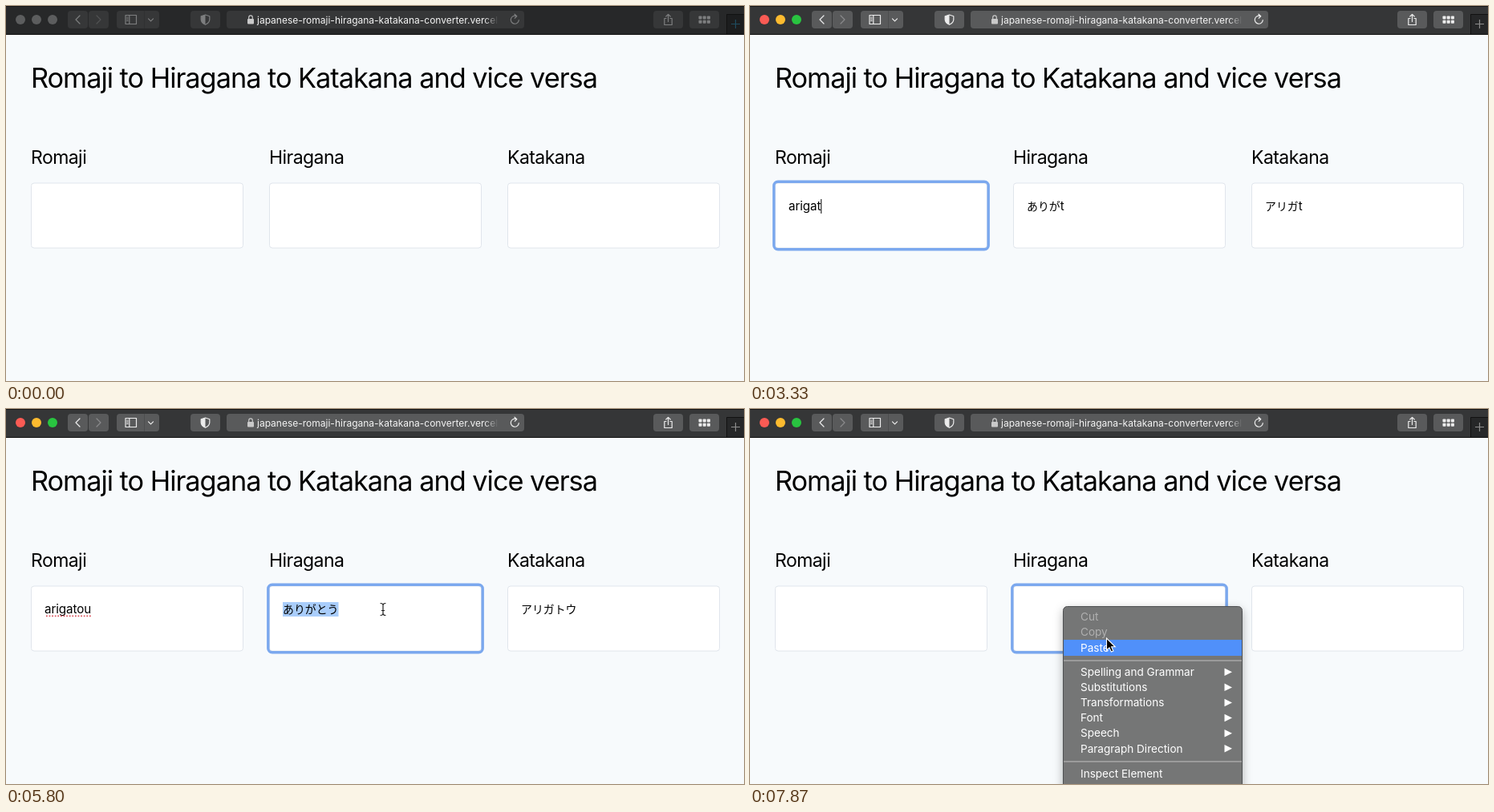
Recreate the animation shown at these times as an HTML page. Size 920 px wide and 468 px high, loop 8 s.

```html
<!DOCTYPE html>
<html lang="en">
<head>
<meta charset="utf-8">
<title>Kana converter</title>
<style>
  html, body { margin: 0; width: 100%; height: 100%; overflow: hidden; background: #f7fafc; }
  svg { display: block; width: 920px; height: 468px; --bar: #353637; --btn: #595a5b; --ink: #ececec; --dim: #8a8a8b; --plus: #8d8d8d; }
  svg.idle { --bar: #272829; --btn: #363738; --ink: #7d7e7f; --dim: #515253; --plus: #1f4c5f; }
  text { font-family: Inter, "Noto Sans CJK JP", "Noto Sans CJK", sans-serif; font-optical-sizing: none; white-space: pre; }
  .title { font-size: 34.3px; letter-spacing: -1.01px; }
  .label { font-size: 23px; letter-spacing: -.55px; }
  .value { font-size: 15.2px; letter-spacing: -.1px; }
  .kana { font-family: "Noto Sans CJK JP", "Noto Sans CJK", sans-serif; font-size: 13.9px; letter-spacing: 0; }
  .url { font-size: 12px; fill: #f4f4f4; }
  .item { font-size: 13.55px; fill: #fff; }
  .off { fill: #b0b0b0; }
  .btn { fill: var(--btn); }
  .icon { fill: none; stroke: var(--ink); stroke-width: 1.2; stroke-linecap: round; stroke-linejoin: round; }
  .solid { fill: var(--ink); }
</style>
</head>
<body>
<svg id="stage" viewBox="0 0 920 468" xmlns="http://www.w3.org/2000/svg">
  <defs>
    <linearGradient id="fade" gradientUnits="userSpaceOnUse" x1="596" x2="614" y1="0" y2="0">
      <stop offset="0" stop-color="#fff"/><stop offset="1" stop-color="#fff" stop-opacity="0"/>
    </linearGradient>
    <mask id="urlMask" maskUnits="userSpaceOnUse" x="300" y="0" width="320" height="36">
      <rect x="300" width="313" height="36" fill="url(#fade)"/>
    </mask>
    <filter id="shadow" x="-20%" y="-20%" width="140%" height="140%">
      <feDropShadow dx="0" dy="4" stdDeviation="6" flood-color="#000" flood-opacity=".3"/>
    </filter>
  </defs>
  <rect width="920" height="468" fill="#f7fafc"/>
  <g id="toolbar"></g>
  <text class="title" x="31" y="102">Romaji to Hiragana to Katakana and vice versa</text>
  <g id="fields"></g>
  <rect id="ring" y="219.2" width="267.4" height="84.6" rx="5" fill="none" stroke="#7ba8ee" stroke-width="3.4"/>
  <rect id="selection" x="345" y="241" width="69.5" height="18" fill="#a9cdfb"/>
  <g id="values"></g>
  <path id="spelling" d="M50 258.3H107" stroke="#d9505a" stroke-width="1.7" stroke-dasharray="1.7 1.9"/>
  <rect id="caret" y="241" width="1" height="18"/>
  <g id="menu"></g>
  <g id="beam" fill="none" stroke-linecap="round">
    <path d="M-3 -7.5Q0 -7.5 0 -5Q0 -7.5 3 -7.5M0 -5V5M-3 7.5Q0 7.5 0 5Q0 7.5 3 7.5M-1.6 1.5H1.6" stroke="#222" stroke-width="1.2"/>
  </g>
  <path id="arrow" d="M0 0V15L3.5 11.8L5.9 17L8.4 15.9L6.1 10.8H10.8Z" fill="#000" stroke="#fff" stroke-width="1.1"/>
</svg>
<script>
const $ = id => document.getElementById(id);
const show = (id, on) => $(id).setAttribute('visibility', on ? 'visible' : 'hidden');
const LOOP = 8000, TICK = 1000 / 15;
const LEFT = [31, 328, 625];

function buildToolbar() {
  const button = (x, w) => `<rect class="btn" x="${x}" y="6" width="${w}" height="22" rx="4"/>`;
  const icon = (d, extra = '') => `<path class="icon" d="${d}" ${extra}/>`;
  const dots = [0, 1, 2].flatMap(c => [0, 1].map(r =>
    `<rect class="solid" x="${863.5 + c * 5.2}" y="${12.5 + r * 5.2}" width="4" height="4" rx=".8"/>`));
  $('toolbar').innerHTML = `
    <rect width="920" height="36" style="fill:var(--bar)"/>
    <rect width="920" height="1" fill="#161616"/>
    <rect x="898" y="10" width="22" height="26" fill="#000" opacity=".28"/>
    <path d="M898.5 36V10.5H920" fill="none" stroke="#121212"/>
    <path d="M904 22.5H915M909.5 17V28" style="stroke:var(--plus)" stroke-width="1.2"/>
    <rect y="35" width="920" height="1" fill="#111"/>
    ${[18, 38, 58].map(x => `<circle class="light" cx="${x}" cy="17" r="6"/>`).join('')}
    ${button(77, 25)}${button(103, 25)}${button(138, 53)}${button(230, 37)}
    ${button(275, 371)}${button(807, 37)}${button(852, 37)}
    ${icon('M92 12L87 17L92 22', 'stroke-width="1.6"')}
    ${icon('M113 12L118 17L113 22', 'style="stroke:var(--dim)"')}
    ${icon('M149 11.5H162.5V22.5H149ZM153.8 11.5V22.5M150.8 14H152M150.8 16.2H152M150.8 18.4H152')}
    <path d="M172.5 6V28" style="stroke:var(--bar)" opacity=".35"/>
    ${icon('M177.5 15.8L180.5 18.8L183.5 15.8')}
    ${icon('M248.5 11L253.8 12.8V17Q253.6 21 248.5 23.3Q243.4 21 243.2 17V12.8Z')}
    <path class="solid" d="M248.5 11L243.2 12.8V17Q243.4 21 248.5 23.3Z"/>
    <rect x="301" y="16" width="8" height="6.5" rx="1" fill="#c9c9c9"/>
    ${icon('M302.7 16V14.3A2.3 2.5 0 0 1 307.3 14.3V16', 'style="stroke:#c9c9c9"')}
    <text class="url" x="313" y="21.5" mask="url(#urlMask)">japanese-romaji-hiragana-katakana-converter.vercel.</text>
    ${icon('M639.3 17.5A5 5 0 1 1 636.2 12.6M634 10.2L636.8 12.7L634.2 15.2')}
    ${icon('M823 15.5H820.8V23.5H830.2V15.5H828M825.5 19.5V10.5M822.8 13L825.5 10.3L828.2 13')}
    ${dots.join('')}`;
}

function buildFields() {
  $('fields').innerHTML = ['Romaji', 'Hiragana', 'Katakana'].map((name, i) => `
    <text class="label" x="${LEFT[i]}" y="197">${name}</text>
    <rect x="${LEFT[i] + .5}" y="221" width="264" height="81" rx="3.5" fill="#fff" stroke="#e0e5ec"/>`).join('');
  $('values').innerHTML = LEFT.map(x => `<text class="value" x="${x + 17}" y="255"></text>`).join('');
}

function buildMenu() {
  const item = (label, y, cls = '') => `<text class="item ${cls}" x="412" y="${y}">${label}</text>`;
  const submenus = ['Spelling and Grammar', 'Substitutions', 'Transformations', 'Font', 'Speech', 'Paragraph Direction'];
  const line = y => `<rect x="391" y="${y}" width="222" height="2" fill="#9b9b9b"/>`;
  $('menu').innerHTML = `
    <rect x="390.5" y="246.5" width="223" height="240" rx="5" fill="#757676" stroke="#505152" filter="url(#shadow)"/>
    <rect id="highlight" x="391" y="288" width="222" height="20" fill="#5090fa"/>
    ${item('Cut', 264, 'off')}${item('Copy', 283, 'off')}${item('Paste', 302.5)}${line(313)}
    ${submenus.map((s, i) => {
      const y = 333 + i * 19.1;
      return item(s, y) + `<path fill="#fff" d="M591.5 ${y - 9.5}L601 ${y - 4.7}L591.5 ${y}Z"/>`;
    }).join('')}
    ${line(439)}${item('Inspect Element', 460)}`;
}

const typing = [
  [0, '', '', ''],
  [1730, 'a', 'あ', 'ア'],
  [2330, 'ar', 'あr', 'アr'],
  [2470, 'ari', 'あり', 'アリ'],
  [2670, 'arig', 'ありg', 'アリg'],
  [3000, 'ariga', 'ありが', 'アリガ'],
  [3330, 'arigat', 'ありがt', 'アリガt'],
  [3530, 'arigato', 'ありがと', 'アリガト'],
  [4000, 'arigatou', 'ありがとう', 'アリガトウ'],
  [6270, '', '', '']
];

// Pointer stops: time, x, y
const pointer = [
  [130, 250, 404], [470, 170, 281], [600, 170, 281], [733, 149, 247],
  [4660, 149, 247], [5533, 458, 251], [5800, 470, 250],
  [6400, 470, 250], [6733, 356, 350], [6800, 356, 350], [7067, 390, 249],
  [7600, 390, 249], [7867, 444.5, 286]
];

function pointerAt(t) {
  const next = pointer.findIndex(p => p[0] > t);
  if (next < 1) return pointer[next < 0 ? pointer.length - 1 : 0].slice(1);
  const [a, b] = [pointer[next - 1], pointer[next]];
  const k = (1 - Math.cos(Math.PI * (t - a[0]) / (b[0] - a[0]))) / 2;
  return [1, 2].map(i => a[i] + (b[i] - a[i]) * k);
}

const within = (t, ...spans) => spans.some(([from, to]) => t >= from && t < to);
let shown = null;

function setValues(row) {
  if (row === shown) return;
  shown = row;
  [...$('values').children].forEach((el, i) => {
    el.innerHTML = row[i + 1].replace(/[^\x00-\x7f]+/g, '<tspan class="kana">$&</tspan>');
  });
}

function render(time) {
  const t = Math.floor((time + 5) / TICK) * TICK + 1;

  const active = t >= 130;
  $('stage').classList.toggle('idle', !active);
  const lights = active ? ['#fb5b54', '#fdbb2f', '#29c440'] : Array(3).fill('#5c5d5e');
  document.querySelectorAll('.light').forEach((el, i) => el.setAttribute('fill', lights[i]));

  setValues(typing.filter(row => row[0] <= t).pop());

  const romajiFocus = within(t, [865, 5400]);
  const hiraganaFocus = within(t, [5400, 6730], [7330, LOOP + TICK]);
  show('ring', romajiFocus || hiraganaFocus);
  $('ring').setAttribute('x', LEFT[romajiFocus ? 0 : 1] - 1.2);
  show('spelling', within(t, [5400, 6270]));
  show('selection', within(t, [5665, 6270]));

  show('caret', within(t, [930, 1330], [1730, 2265], [2330, 4530], [6270, 6730]));
  const typed = $('values').children[0].getComputedTextLength();
  $('caret').setAttribute('x', romajiFocus ? 48 + typed : 345);

  show('menu', t >= 7330);
  show('highlight', t >= 7840);

  const [x, y] = pointerAt(t);
  const overField = y > 221 && y < 302 && LEFT.some(l => x > l && x < l + 265);
  const visible = within(t, [130, 1730], [4730, 6270], [6465, LOOP + TICK]);
  const beam = overField && t < 7465;
  show('beam', visible && beam);
  show('arrow', visible && !beam);
  for (const id of ['beam', 'arrow']) $(id).setAttribute('transform', `translate(${x} ${y})`);
}

buildToolbar();
buildFields();
buildMenu();
const start = performance.now();
function frame() {
  render((performance.now() - start) % LOOP);
  requestAnimationFrame(frame);
}
frame();
</script>
</body>
</html>
```
